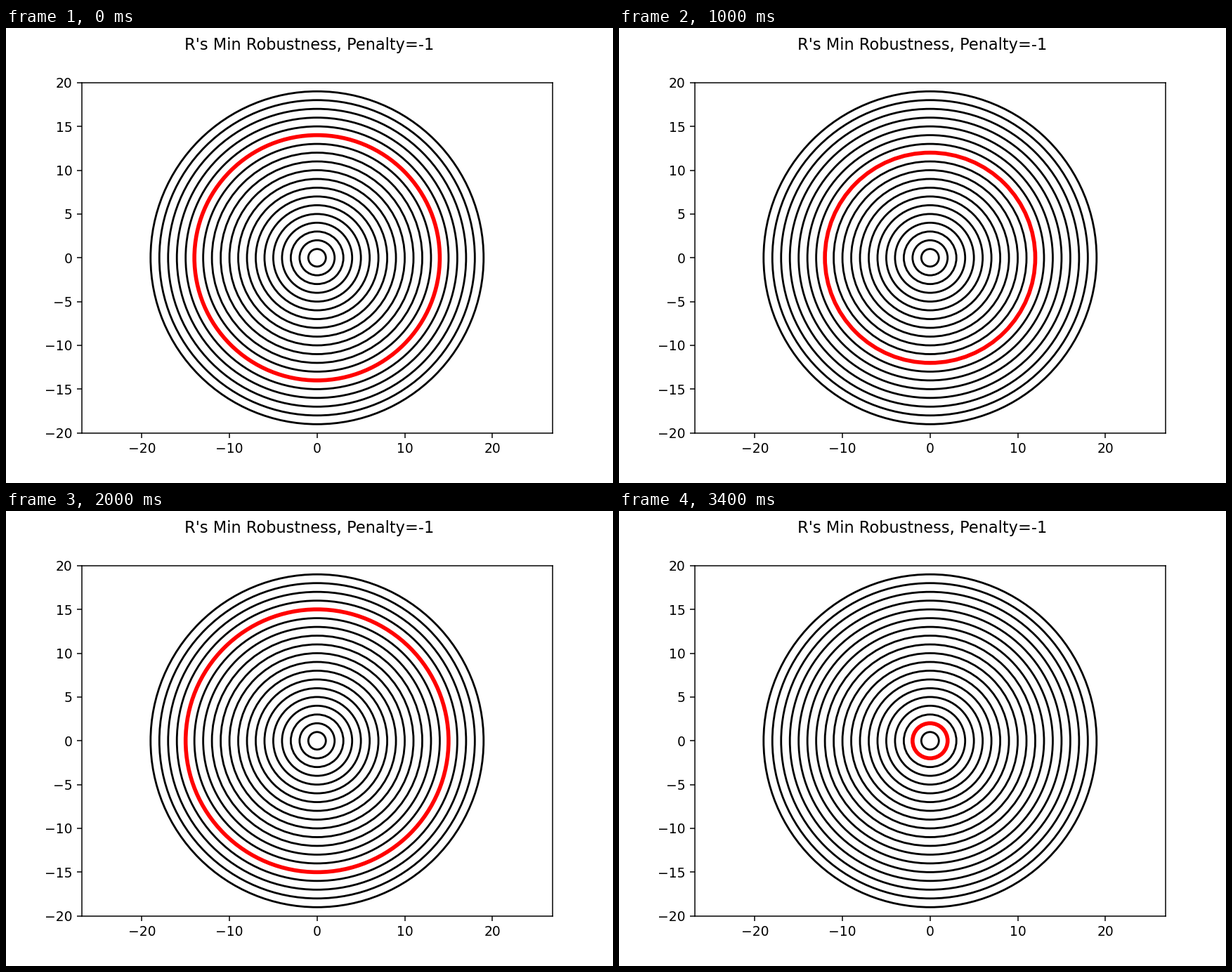
These frames come from a looping animation (864 by 648 pixels, 3.6 s). A matplotlib script:

```python
import matplotlib.pyplot as plt
from matplotlib.animation import FuncAnimation
from matplotlib.patches import Circle

STEP_MS = 200
RINGS = range(1, 20)
# Highlighted radius at each step; repeated values are pauses.
PATH = [14, 12, 10, 17, 15, 12, 12, 12, 10,
        17, 15, 12, 8, 8, 8, 7, 5, 2]

plt.rcParams["font.family"] = "DejaVu Sans"

fig = plt.figure(figsize=(6.4, 4.8), dpi=135, facecolor="white")
ax = fig.add_axes([0.125, 0.11, 0.775, 0.77])
fig.suptitle("R's Min Robustness, Penalty=-1", fontsize=12, y=0.98)

# Equal scale on both axes: the wider side shows more units.
half_width = 20 * (0.775 * 6.4) / (0.77 * 4.8)
ax.set_xlim(-half_width, half_width)
ax.set_ylim(-20, 20)
ax.set_xticks(range(-20, 21, 10))
ax.set_yticks(range(-20, 21, 5))

rings = {r: ax.add_patch(Circle((0, 0), r, fill=False)) for r in RINGS}


def update(step):
    for radius, ring in rings.items():
        active = radius == PATH[step]
        ring.set_edgecolor("red" if active else "black")
        ring.set_linewidth(3 if active else 1.5)
    return list(rings.values())


anim = FuncAnimation(fig, update, frames=len(PATH), interval=STEP_MS,
                     repeat=True, repeat_delay=0, blit=False)
plt.show()
```
